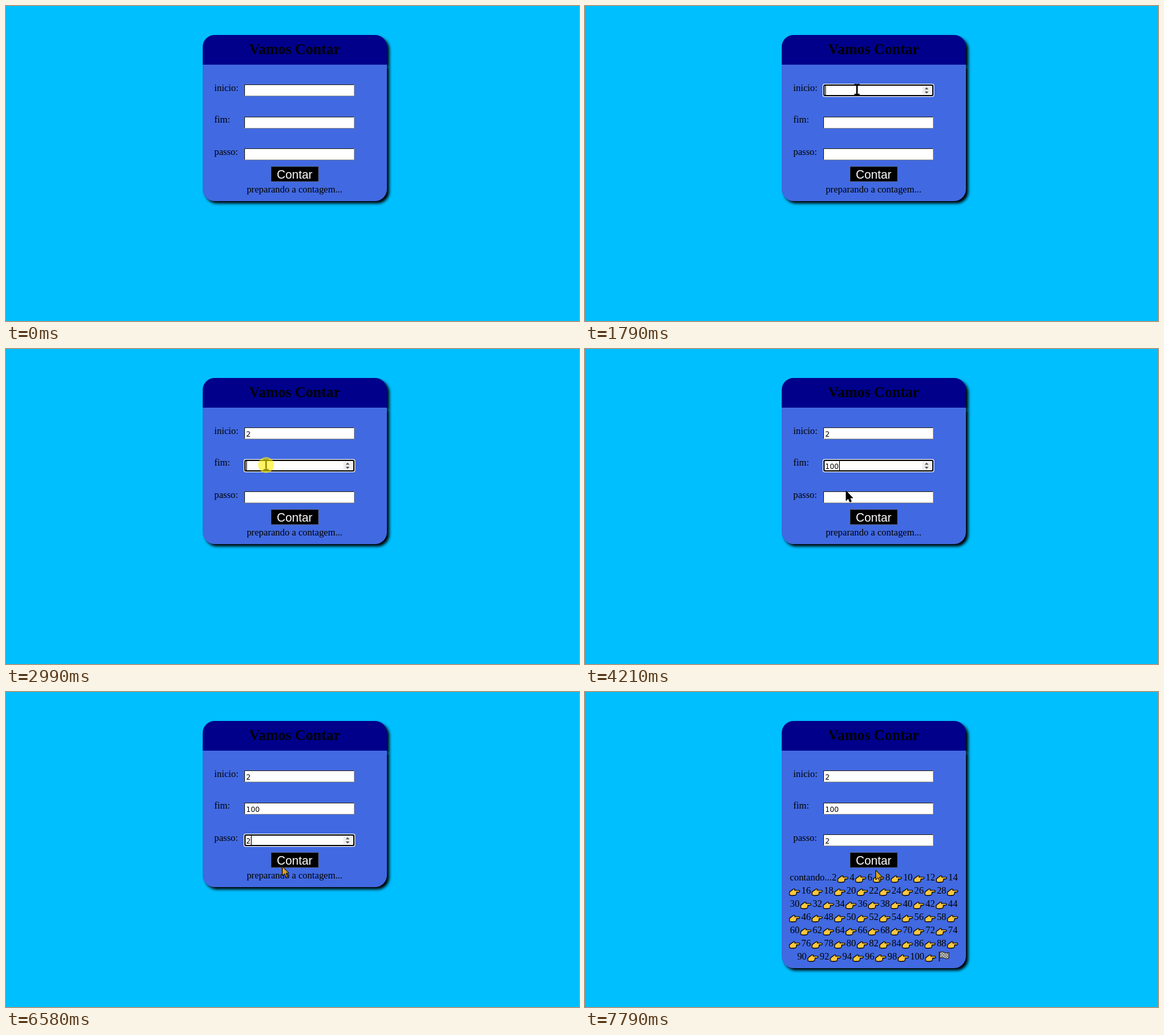
An HTML page that plays this animation: 868x478 px, repeating every 8000 ms.

```html
<!DOCTYPE html>
<html lang="pt">
<head>
<meta charset="utf-8">
<title>Vamos Contar</title>
<style>
  html, body { margin: 0; width: 100%; height: 100%; overflow: hidden; background: #00bfff; }
  .part { position: absolute; left: 298px; width: 279px; box-shadow: 3.6px 3.6px 4.5px #000; }
  #head { top: 44px; height: 45px; background: #00008b; border-radius: 18px 18px 0 0; }
  #body { top: 89px; height: 207px; background: #4169e1; border-radius: 0 0 18px 18px; }
  svg { position: absolute; left: 0; top: 0; }
  .serif { font: 14.4px "Liberation Serif", "Times New Roman", serif; }
  .title { font: bold 22.4px "Liberation Serif", "Times New Roman", serif; }
  .button { font: 18px "Liberation Sans", Arial, sans-serif; fill: #fff; }
  .value { font: 10.8px "DejaVu Sans", Verdana, sans-serif; }
  .mid { text-anchor: middle; }
</style>
</head>
<body>
<div id="head" class="part"></div>
<div id="body" class="part"></div>
<svg id="stage" width="868" height="478" viewBox="0 0 868 478">
  <defs>
    <path id="hand" d="M1.5 6.5 L4.5 4.2 L8 1.8 Q10.3 1.6 9.2 4 L16 4 Q18 5.2 16 6.6 L12 6.9 Q12.8 8.2 11.8 9 Q12 10.8 10.4 11.4 L5 11.9 L1.5 11 Z"
      fill="#ffc83d" stroke="#000" stroke-width="1.1" stroke-linejoin="round"/>
    <pattern id="check" width="4" height="4" patternUnits="userSpaceOnUse">
      <rect width="4" height="4" fill="#c4c4c4"/>
      <path d="M0 0h2v2H0zM2 2h2v2H2z" fill="#777"/>
    </pattern>
    <g id="flag">
      <path d="M3 1 Q7 -1 10 1 T17 1 V10 Q13 12 10 10 T3 10 Z" fill="url(#check)" stroke="#222"/>
      <path d="M2.5 0V15" stroke="#222" stroke-width="1.6"/>
    </g>
  </defs>
  <text class="title mid" x="437.3" y="73">Vamos Contar</text>
  <text class="serif" x="315.5" y="129">inicio:</text>
  <text class="serif" x="315.5" y="177">fim:</text>
  <text class="serif" x="315.5" y="226">passo:</text>
  <g id="fields"></g>
  <rect x="401.5" y="243.5" width="72" height="23" fill="#000" stroke="#4f5f8c"/>
  <text class="button mid" x="437.3" y="262">Contar</text>
  <text id="wait" class="serif mid" x="437.2" y="283">preparando a contagem...</text>
  <g id="result"></g>
  <g id="cursor">
    <path id="arrow" d="M.5 .5 V15 L3.9 11.8 L6.3 17.2 L8.5 16.2 L6.2 11 H10.6 Z" stroke="#000"/>
    <g id="beam" fill="none">
      <path d="M-4 -7.5H-1L0 -6.5L1 -7.5H4M-4 7.5H-1L0 6.5L1 7.5H4M0 -7V7" stroke="#000" stroke-width="2.4"/>
      <path id="core" d="M0 -6V6" stroke="#b8c4e8" stroke-width="1"/>
    </g>
  </g>
  <circle id="halo" r="12" fill="#ffee00" fill-opacity=".6"/>
</svg>
<script>
const LOOP = 8000, BLINK = 530, DONE = 7110;
const $ = id => document.getElementById(id);

function add(parent, tag, attrs, text) {
  const el = document.createElementNS("http://www.w3.org/2000/svg", tag);
  for (const k in attrs) el.setAttribute(k, attrs[k]);
  if (text !== undefined) el.textContent = text;
  return parent.appendChild(el);
}
const show = (el, on) => el.setAttribute("visibility", on ? "visible" : "hidden");
const box = (g, x, y, width, height, fill, rx = 0) => add(g, "rect", { x, y, width, height, fill, rx });

// Input fields
const fields = [119, 168, 216].map(y => {
  const g = add($("fields"), "g", { transform: `translate(361 ${y})` });
  const idle = add(g, "g", {});
  box(idle, 0, 0, 167, 18, "#8c8c8c");
  box(idle, 0, 0, 166, 17, "#2c2c2c");
  box(idle, 1, 1, 165, 16, "#fff");
  const ring = add(g, "g", {});
  box(ring, -1, -1, 169, 20, "#fff", 3);
  box(ring, 0, 0, 167, 18, "#101010", 2.5);
  box(ring, 2, 2, 163, 14, "#fff", 1);
  const spin = add(g, "g", {});
  box(spin, 150, 3, 13, 12, "#efefef");
  add(spin, "path", { d: "M153.5 7.5h6l-3 -3zM153.5 10.8h6l-3 3z", fill: "#4a4a4a" });
  const value = add(g, "text", { class: "value", x: 2.8, y: 14 });
  const caret = box(g, 3, 2, 1, 14, "#000");
  return { ring, spin, value, caret };
});

// Counted numbers, wrapped and centred
function buildResult() {
  const digit = 7.2, icon = 19.8, limit = 261;
  const items = [{ text: "contando...", w: 63.6 }];
  for (let n = 2; n <= 100; n += 2) {
    items.push({ text: String(n), w: digit * String(n).length }, { icon: "#hand", w: icon });
  }
  items.push({ icon: "#flag", w: icon });
  const lines = [[]];
  let used = 0;
  for (const it of items) {
    if (used + it.w > limit) { lines.push([]); used = 0; }
    lines[lines.length - 1].push(it);
    used += it.w;
  }
  lines.forEach((line, i) => {
    const base = 286 + i * 20;
    let x = 437.5 - line.reduce((s, it) => s + it.w, 0) / 2;
    for (const it of line) {
      if (it.text) add($("result"), "text", { class: "serif", x, y: base }, it.text);
      else add($("result"), "use", { href: it.icon, x: x + 0.4, y: base - (it.icon === "#flag" ? 12 : 9) });
      x += it.w;
    }
  });
}
buildResult();

// time, field, value, caret phase
const events = [
  [1530, 0, ""], [1995, 0, "2"],
  [2990, 1, ""], [3480, 1, "1", BLINK], [3810, 1, "10"], [3940, 1, "100"],
  [4800, 2, ""], [6260, 2, "2"]
];
const blur = 7050;

// time, x, y of the pointer
const path = [
  [170, 773, 470], [242, 722, 436], [314, 685, 402], [386, 650, 377], [458, 625, 361],
  [600, 625, 361], [665, 572, 322], [731, 528, 287], [798, 492, 256], [864, 462, 213],
  [931, 448, 188], [1064, 432, 158], [1197, 420, 136], [1263, 416, 121], [1330, 412, 124],
  [1530, 412, 124], [1790, 412, 127], [1995, 412, 128], [2128, 411, 143], [2261, 409, 160],
  [2394, 405, 187], [2460, 399, 182], [2594, 395, 179], [2660, 394, 176], [3800, 394, 176],
  [3990, 395, 190], [4180, 395, 215], [4210, 395, 215], [4340, 391, 224], [4600, 393, 223],
  [6250, 393, 223], [6384, 402, 245], [6517, 416, 262], [6583, 418, 264], [6780, 418, 265],
  [6980, 424, 260], [7050, 426, 258], [7500, 426, 258], [7780, 440, 270]
];
// from, to, field under the pointer
const hovers = [[860, 925, 2], [926, 990, 1], [1190, 2060, 0], [2455, 3930, 1], [4250, 6320, 2]];
const clicks = [[1530, 1650], [2990, 3140], [4800, 4930], [7050, 7180]];

const inside = (t, [a, b]) => t >= a && t < b;
const snap = t => t < 500
  ? 170 + Math.floor((t - 170) / 72) * 72
  : Math.floor((t + 6) / 66.5) * 66.5;

function pointer(t) {
  const i = path.findIndex(p => p[0] > t);
  if (i < 0) return path[path.length - 1].slice(1);
  if (i === 0) return path[0].slice(1);
  const a = path[i - 1], b = path[i], k = (t - a[0]) / (b[0] - a[0]);
  return [1, 2].map(j => Math.round(a[j] + (b[j] - a[j]) * k));
}

function draw(t) {
  const values = ["", "", ""];
  let last = null;
  for (const e of events) {
    if (t < e[0]) break;
    values[e[1]] = e[2];
    last = e;
  }
  const focus = last && t < blur ? last[1] : -1;
  const hover = hovers.find(h => inside(t, h));
  fields.forEach((f, i) => {
    const on = i === focus;
    show(f.ring, on);
    show(f.spin, on || (hover && hover[2] === i));
    if (f.value.textContent !== values[i]) f.value.textContent = values[i];
    const lit = on && Math.floor((t - last[0] + (last[3] || 0)) / BLINK) % 2 === 0;
    show(f.caret, lit);
    f.caret.setAttribute("x", 3 + Math.round(values[i].length * 6.87));
  });

  const done = t >= DONE;
  $("body").style.height = (done ? 330 : 207) + "px";
  show($("wait"), !done);
  show($("result"), done);

  const [x, y] = pointer(snap(t));
  const seen = t >= 170;
  $("cursor").setAttribute("transform", `translate(${x} ${y})`);
  show($("arrow"), seen && !hover);
  $("arrow").setAttribute("fill", t >= 6260 ? "#d9a22b" : "#000");
  show($("beam"), seen && hover);
  show($("core"), seen && hover && t < 1000);
  $("halo").setAttribute("cx", x);
  $("halo").setAttribute("cy", y);
  show($("halo"), clicks.some(c => inside(t, c)));
}

let start = null;
function tick(now) {
  if (start === null) start = now;
  draw((now - start) % LOOP);
  requestAnimationFrame(tick);
}
draw(0);
requestAnimationFrame(tick);
</script>
</body>
</html>
```
